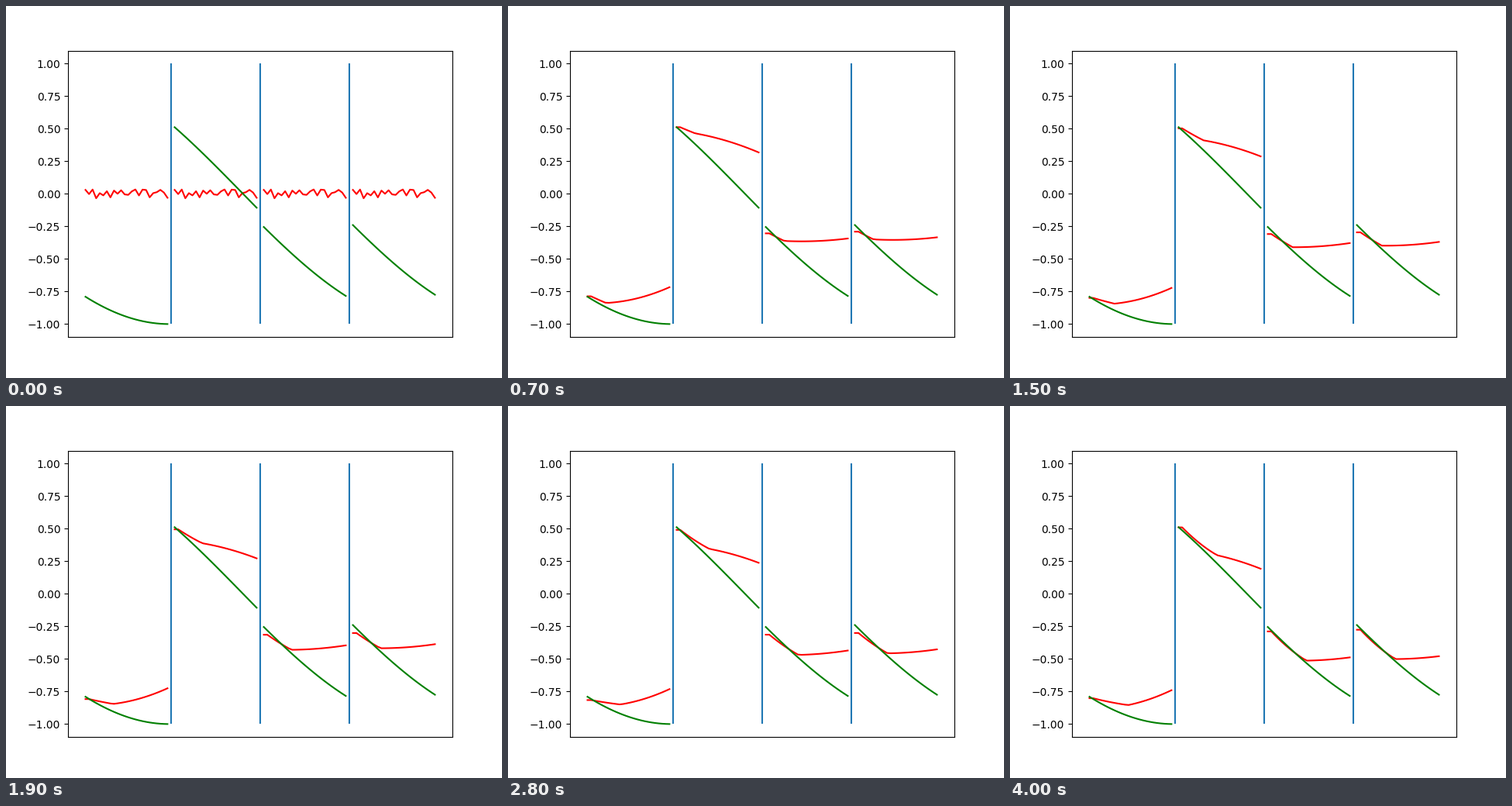
Write a matplotlib script that moves like this. It is 640 px wide and 480 px high and loops after 4100 ms.

```python
import numpy as np
import matplotlib.pyplot as plt
from matplotlib.animation import FuncAnimation

FRAMES, INTERVAL = 41, 100
POINTS, PERIOD = 24, 25          # samples per panel, panel spacing
STEP = 0.028                     # phase advance per sample
idx = np.arange(POINTS)
last = POINTS - 1

# One row per panel: phase of the true curve, then (value, rate) for the
# prediction's start, bend and end, and the curl of its tail.
PANELS = [
    (0.911, (-0.795, -0.0004), (-0.823, -0.0048), (-0.712, -0.0007), 3.0e-4),
    (-0.5375, (0.501, 0), (0.621, -0.0495), (0.345, -0.0038), -1.9e-4),
    (0.257, (-0.318, 0.0005), (-0.221, -0.0445), (-0.312, -0.0044), 1.3e-4),
    (0.242, (-0.305, 0.0005), (-0.209, -0.0445), (-0.303, -0.0044), 1.3e-4),
]


def join(panels):
    """Lay the panels side by side with a gap between them."""
    return np.concatenate([np.append(p, np.nan) for p in panels])[:-1]


def fitted(n, start, bend, end, curl):
    """A flat start, a slope down to the bend and a curling tail."""
    root = np.sqrt(n + 3)        # learning slows down with time
    knee = 1.65 * root
    y0 = start[0] + start[1] * n + 0.011 * np.cos(2 * np.pi * (n - 7) / 36)
    y1 = bend[0] + bend[1] * root
    y2 = end[0] + end[1] * n
    u = np.clip((idx - 1) / (knee - 1), 0, 1)
    past = np.clip(idx - knee, 0, None)
    head = y0 + (y1 - y0) * (u + 0.007 * n * u * (1 - u))
    tail = (y2 - y1) * past / (last - knee) - curl * past * (last - idx)
    return head + tail


def prediction(n):
    if n == 0:                   # untrained: the same noise in every panel
        noise = np.random.default_rng(4).uniform(-0.04, 0.035, POINTS)
        return join([noise] * len(PANELS))
    return join([fitted(n, *shape) for _, *shape in PANELS])


truth = join([-np.sin(phase + STEP * idx) for phase, *_ in PANELS])
x = np.arange(len(truth))

fig, ax = plt.subplots(figsize=(6.4, 4.8), dpi=100)
ax.vlines([k * PERIOD - 1 for k in (1, 2, 3)], -1, 1)
line, = ax.plot(x, prediction(0), "r")
ax.plot(x, truth, "g")
ax.set_xlim(-0.05 * x[-1], 1.05 * x[-1])
ax.set_ylim(-1.1, 1.1)
ax.set_xticks([])


def update(n):
    line.set_ydata(prediction(n))
    return line,


anim = FuncAnimation(fig, update, frames=FRAMES, interval=INTERVAL, repeat=True)
plt.show()
```
